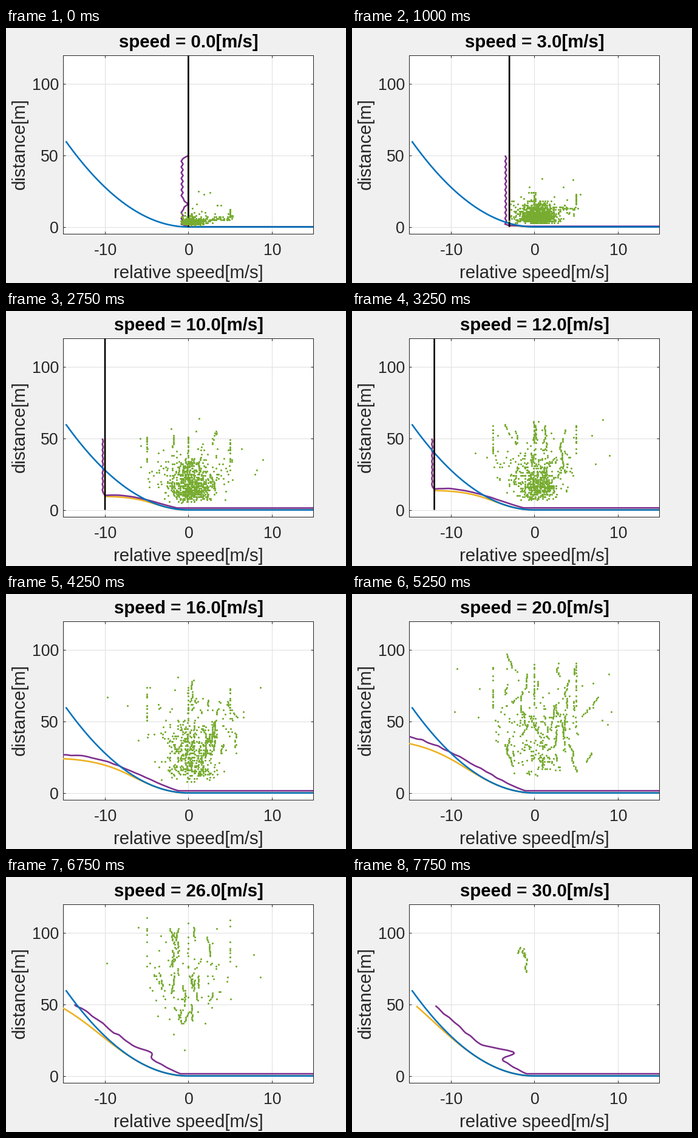
A matplotlib script that plays this animation: 560 by 420 pixels, repeating every 8 s.

```python
import numpy as np
import matplotlib.pyplot as plt
from matplotlib.animation import FuncAnimation

W, H, DPI = 560, 420, 80
PX = 72 / DPI  # points per pixel
BLUE, YELLOW, PURPLE, GREEN = "#0072bd", "#edb120", "#7e2f8e", "#77ac30"
INK = "#262626"
TICK, LABEL = 26.67, 29.33

plt.rcParams["font.family"] = "Liberation Sans"
fig = plt.figure(figsize=(W / DPI, H / DPI), dpi=DPI, facecolor="#f0f0f0")
ax = fig.add_axes([94.4 / W, 1 - 339.4 / H, 412 / W, 294 / H])
ax.set(xlim=(-15, 15), ylim=(-5, 120), xticks=(-10, 0, 10), yticks=(0, 50, 100))
ax.set_axisbelow(True)
ax.grid(color="#dfdfdf", linewidth=PX)
ax.tick_params(direction="in", top=True, right=True, length=4 * PX, width=PX,
               color=INK, labelbottom=False, labelleft=False)
for spine in ax.spines.values():
    spine.set(linewidth=PX, color=INK)


def label(x, y, text, size, ha="center", color=INK, **kw):
    return fig.text(x / W, 1 - y / H, text, fontsize=size * PX, ha=ha,
                    va="baseline", color=color, **kw)


for val in (-10, 0, 10):
    label(301 + val * 13.73, 374.5, str(val), TICK)
for val in (0, 50, 100):
    label(87, 337.5 - val * 2.352, str(val), TICK, ha="right")
label(300.5, 412.5, "relative speed[m/s]", LABEL)
label(31, 191, "distance[m]", LABEL, rotation=90, rotation_mode="anchor")
title = label(300.5, 32.5, "", LABEL, color="black", weight="bold")


def curve(color, z):
    return ax.plot([], [], color=color, lw=2.6 * PX, zorder=z, snap=False,
                   solid_joinstyle="round", solid_capstyle="butt")[0]


yellow, purple = curve(YELLOW, 3), curve(PURPLE, 4)
blue, black = curve(BLUE, 5), curve("black", 6)
dots, = ax.plot([], [], "o", color=GREEN, ms=3.1 * PX, mew=0, zorder=7)

closing = np.linspace(-np.sqrt(216), 0, 40)
blue.set_data(np.append(closing, 15), np.append(closing ** 2 / 3.6, 0))


def stop_distance(v):
    return v * v / 10.6


def late(v):
    """0 up to 23 m/s, then rising to 1 at 30 m/s."""
    return np.clip((v - 23) / 7, 0, 1)


def safe_curve(v):
    """Smooth minimum of the closing parabola and the braking distance."""
    x = np.linspace(-v, 0, 90)
    a = x ** 2 / 3.6
    b = (2 * v * -x - x ** 2) / 10.6
    d = a * b / ((a ** 4 + b ** 4) ** 0.25 + 1e-9)
    x, d = x[d <= 50], d[d <= 50]
    if stop_distance(v) < 50:
        x, d = np.r_[-v, x], np.r_[50, d]
    return np.r_[x, 15], np.r_[d, 0]


def measured_curve(v):
    rng = np.random.default_rng(100 + v)
    peak = stop_distance(v)
    floor = 1.5 * (1 - np.exp(-(v / 6) ** 1.6))

    # wavy upright part beside the speed line, pinched to it at rest
    d_up = np.arange(50, peak * 1.08, -2.0)
    zig = 0.11 * np.exp(-v / 15) * (-1.0) ** np.arange(len(d_up))
    rest = np.exp(-2 * v)
    pinch = np.exp(-((d_up - 16) / 2.2) ** 2) + np.exp(-(d_up - 50) ** 2)
    off = (0.25 + 0.5 * np.exp(-v / 3) + zig) * (1 - rest * pinch)

    # rough slope down to the floor, with a hook at high speed
    x = np.linspace(-min(v, 16), 0, 90)
    slope = 1.1 * peak * np.sin(0.55 * np.pi * -x / max(v, 1)) ** 1.4
    knots = np.linspace(-16, 0, 26)
    rough = np.interp(x, knots, rng.normal(0, 0.01 * peak, len(knots)))
    d = np.maximum(floor, slope + rough * np.clip(slope / 20, 0, 0.8))
    x = x + 2.7 * late(v) * np.exp(-((d - 16.5) / 3) ** 2)
    x, d = x[d <= 50], d[d <= 50]
    return np.r_[-v - off, x, 15], np.r_[d_up, d, floor]


def trace(rng, x, y, steps):
    """A mostly upright chain of echoes, one metre apart, with gaps."""
    drift = rng.normal(0, 0.05) + rng.normal(0, 0.06, steps)
    keep = rng.random(steps) < 0.85
    return np.c_[x + np.cumsum(drift), y + np.arange(steps)][keep]


def echoes(v):
    """Radar echoes: a dense core that thins out and spreads with speed."""
    rng = np.random.default_rng(7 + v)
    near, far = 1 + 0.35 * v, min(4 * v + 12, 104)
    fade = 1 - late(v)

    n = int(fade * (1500 * np.exp(-((v - 5) / 4) ** 2)
                    + 400 * np.exp(-((v - 13) / 6) ** 2)))
    core = np.c_[rng.normal(0.4, 0.9 + 0.03 * v, n),
                 near + rng.gamma(3, 1 + 0.32 * v, n)]

    n = int(100 * fade)
    x = rng.uniform(-0.8 * min(v, 6), 5.3, n)
    halo = np.c_[x, rng.normal(3.5 + 0.6 * x + 2.3 * v, 1 + 0.6 * v)]

    n = int(14 * fade)
    x = rng.uniform(-min(v, 10), 4 + min(v, 6), n)
    strays = np.c_[x, rng.uniform(2 * v + 5, 3.2 * v + 25, n)]

    parts = [core, halo, strays]
    for lane in (-5, 0, 5):
        n = int(16 * fade) if lane > -v else 0
        parts.append(np.c_[np.full(n, lane),
                           rng.uniform(2.6 * v + 8, 4 * v + 12, n)])

    count = 4 + int(1.5 * max(v - 5, 0) * fade)
    for _ in range(count * (v > 4)):
        x = rng.normal(1.2 - 3 * late(v), 2.2 * fade + 0.4)
        y = rng.uniform(near + 4 + 45 * late(v), far - 8)
        parts.append(trace(rng, x, y, rng.integers(5, 9 + int(0.7 * v * fade))))

    p = np.vstack(parts)
    p = p[(p[:, 0] > -v - 0.9) & (p[:, 1] >= near) & (p[:, 1] < 112)]
    return np.round(p[:, 0], 1), np.round(p[:, 1])


def draw(i):
    v = max(0, i - 1)
    title.set_text(f"speed = {v:.1f}[m/s]")
    yellow.set_data(*safe_curve(v))
    purple.set_data(*measured_curve(v))
    black.set_data([-v, -v], [0, 120])
    dots.set_data(*echoes(v))
    return title, yellow, purple, black, dots


anim = FuncAnimation(fig, draw, frames=32, interval=250, repeat=True,
                     repeat_delay=0, blit=False)
plt.show()
```
